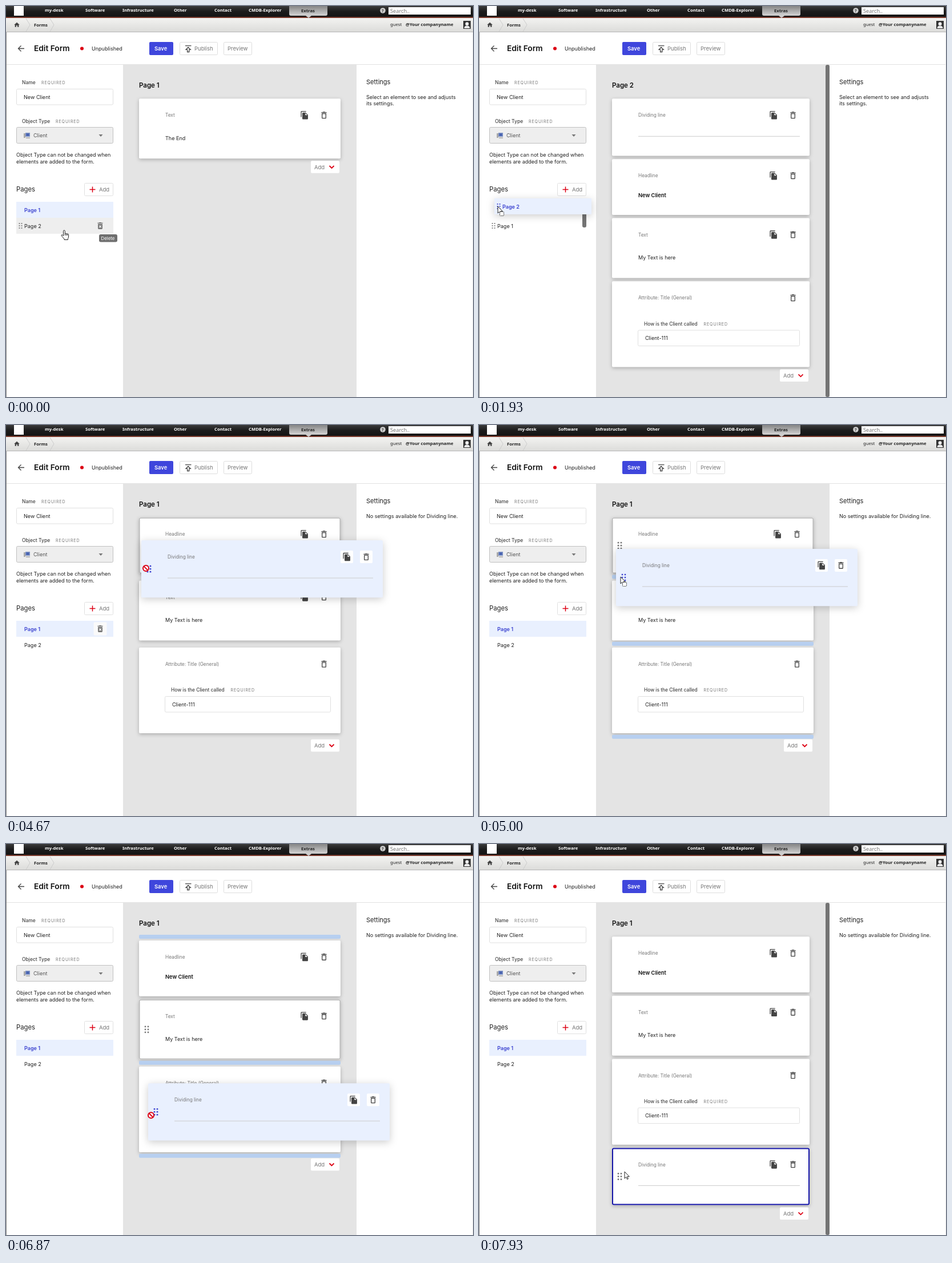
Write an HTML page that moves like this. It is 818x685 px and loops after 8 s.

```html
<!DOCTYPE html>
<html lang="en">
<head>
<meta charset="utf-8">
<title>Form editor</title>
<style>
html, body { margin: 0; width: 100%; height: 100%; overflow: hidden; background: #fff; }
svg { display: block; width: 818px; height: 685px; font-family: Inter, sans-serif; }
.nav { font-family: "Noto Sans", sans-serif; }
.card { filter: drop-shadow(0 2px 3px rgba(0,0,0,.25)); }
.lifted { filter: drop-shadow(0 3px 7px rgba(0,0,0,.2)); }
</style>
</head>
<body>
<svg viewBox="0 0 818 685">
  <defs>
    <linearGradient id="bar" x2="0" y2="1"><stop stop-color="#3a3a3a"/><stop offset=".5" stop-color="#1c1c1c"/><stop offset="1" stop-color="#141414"/></linearGradient>
    <linearGradient id="tab" x2="0" y2="1"><stop stop-color="#777"/><stop offset="1" stop-color="#d4d4d4"/></linearGradient>
    <linearGradient id="crumb" x2="0" y2="1"><stop stop-color="#f3f3f1"/><stop offset="1" stop-color="#dcdcda"/></linearGradient>
  </defs>
  <g id="frame"></g>
  <g id="scene"></g>
</svg>
<script>
const LOOP = 8000;
const INK = '#222', GREY = '#777', BLUE = '#3b42d0', PALE = '#e9f0fe', RED = '#dc0014';
const icons = {
  copy: 'M16 1H4c-1.1 0-2 .9-2 2v14h2V3h12V1zm-1 4l6 6v10c0 1.1-.9 2-2 2H8c-1.1 0-2-.9-2-2V7c0-1.1.9-2 2-2h7zm-1 7h5.5L14 6.5V12z',
  trash: 'M6 19c0 1.1.9 2 2 2h8c1.1 0 2-.9 2-2V7H6v12zM8 9h8v10H8V9zm7.5-5l-1-1h-5l-1 1H5v2h14V4h-3.5z',
  remove: 'M6 19c0 1.1.9 2 2 2h8c1.1 0 2-.9 2-2V7H6v12zm2.5-7.1l1.4-1.4 2.1 2.1 2.1-2.1 1.4 1.4-2.1 2.1 2.1 2.1-1.4 1.4-2.1-2.1-2.1 2.1-1.4-1.4 2.1-2.1zM15.5 4l-1-1h-5l-1 1H5v2h14V4z',
  home: 'M10 20v-6h4v6h5v-8h3L12 3 2 12h3v8z'
};

// y is the middle of the capitals
const text = (x, y, s, size = 9.05, fill = INK, weight = 400, more = '') =>
  `<text x="${x}" y="${y + size * .36}" font-size="${size}" fill="${fill}" font-weight="${weight}" ${more}>${s}</text>`;
const rect = (x, y, w, h, fill, r = 0, stroke = 'none', sw = 1) =>
  `<rect x="${x}" y="${y}" width="${w}" height="${h}" rx="${r}" fill="${fill}" stroke="${stroke}" stroke-width="${sw}"/>`;
const line = (d, stroke, sw = 1) => `<path d="${d}" fill="none" stroke="${stroke}" stroke-width="${sw}"/>`;
const shape = (d, fill, more = '') => `<path d="${d}" fill="${fill}" ${more}/>`;
const icon = (name, x, y, fill = '#444', k = .66) =>
  shape(icons[name], fill, `transform="translate(${x - 12 * k} ${y - 12 * k}) scale(${k})"`);
const required = (x, y) => text(x, y, 'REQUIRED', 7, GREY, 400, 'letter-spacing=".95"');

function dots(x, y, gap, r, fill) {
  let s = '';
  for (let i = 0; i < 6; i++)
    s += `<circle cx="${x + (i % 2 - .5) * gap}" cy="${y + ((i >> 1) - 1) * gap}" r="${r}" fill="${fill}"/>`;
  return s;
}

function frame() {
  const menu = [[68, 'my-desk'], [139, 'Software'], [204, 'Infrastructure'], [294, 'Other'], [365, 'Contact'], [425, 'CMDB-Explorer']];
  return `<g class="nav">` +
    rect(0, 0, 818, 19, 'url(#bar)') + rect(0, 19, 818, 2, '#7a3a2c') +
    rect(14, 0, 17, 17, '#fff') +
    rect(496, -3, 67, 20, 'url(#tab)', 3) + shape('M525 17h10l-5 4z', '#ccc') +
    menu.map(([x, s]) => text(x, 7.5, s, 7.7, '#fff', 700)).join('') +
    text(517, 7.8, 'Extras', 7.7, INK, 700) +
    `<circle cx="660" cy="8" r="4.8" fill="#ccc"/>` + text(658, 8, '?', 7.5, '#333', 700) +
    rect(670, 2, 144, 13, '#fff') + text(673, 9, 'Search..', 9.2, GREY) +
    rect(0, 21, 818, 24, 'url(#crumb)') + rect(0, 45, 818, 1, '#b5b5b5') +
    icon('home', 19, 33, '#444', .48) +
    line('M35 22l7 11-7 12M77 22l7 11-7 12', '#ccc') +
    text(49, 33, 'Forms', 7.7, INK, 700) +
    text(673, 32.5, 'guest', 7.7, INK) + text(700, 32.5, '@Your companyname', 7.7, INK, 700) +
    rect(801, 26, 13, 14, '#333') +
    `<circle cx="807.5" cy="31.3" r="3" fill="#eee"/>` + shape('M802.5 39q0-4.5 5-4.5t5 4.5z', '#eee') + '</g>' +
    rect(0, 46, 1, 639, '#888') + rect(205, 103, 409, 582, '#e4e4e4') +
    rect(1, 102, 817, 1, '#e2e2e2') + rect(817, 46, 1, 639, '#eee') +
    line('M32 74.5H21.5M26.5 69.5l-5 5 5 5', '#444', 1.3) +
    text(49, 74.5, 'Edit Form', 13.7, '#111', 600) +
    `<circle cx="133" cy="74.5" r="3" fill="${RED}"/>` + text(150, 75, 'Unpublished') +
    rect(251, 63, 42, 23, '#3f46dc', 2) + text(260, 75, 'Save', 9.4, '#fff', 600) +
    rect(304.5, 63.5, 66, 22, '#fff', 2, '#ddd') + text(330, 75, 'Publish', 9.5, GREY) +
    line('M314 69.6h10.5M319.2 72.3l-4 4h2.4v4.2h3.2v-4.2h2.4z', '#444', 1.3) +
    rect(381.5, 63.5, 49, 22, '#fff', 2, '#ddd') + text(388, 75, 'Preview', 9.5, GREY) +
    text(28, 134, 'Name', 8.5, '#444', 500) + required(62, 134.5) +
    rect(18.5, 145.5, 169, 27.5, '#fff', 2, '#e0e0e0') + text(31, 159.7, 'New Client') +
    text(28, 201.5, 'Object Type', 8.5, '#444', 500) + required(87, 202) +
    rect(18.5, 212.5, 169, 28, '#eee', 2, '#c0c0c0') +
    rect(31, 223, 3, 8, '#aaa') + rect(34, 222, 8, 7, '#7f93c4') + rect(35.5, 223.5, 5, 4, '#4560b0') + rect(35, 230, 7, 2, '#b5b5b5') +
    text(48, 227.2, 'Client', 9.05, '#555') + shape('M162.5 225h7l-3.5 4z', GREY) +
    text(18, 261, 'Object Type can not be changed when') + text(18, 273, 'elements are added to the form.') +
    text(18, 320.5, 'Pages', 11.3) +
    rect(137.5, 310.5, 50, 22, '#fff', 2, '#e0e0e0') + line('M146.5 321.5h10M151.5 316.5v10', RED, 1.5) + text(163, 321.7, 'Add', 9.5, GREY) +
    text(631, 133, 'Settings', 11);
}

// Form cards
const height = { line: 100.2, head: 97.7, text: 105, end: 105, attr: 150.3 };
const label = { line: 'Dividing line', head: 'Headline', text: 'Text', end: 'Text', attr: 'Attribute: Title (General)' };
const GAP = 5.7, ZONE = 6.7, TOP = 162.3;

function card(kind, x, y, w, mode) {
  const h = height[kind], right = x + w, lifted = mode == 'lifted', left = x + 46;
  let s = `<g class="${lifted ? 'lifted' : 'card'}">${rect(x, y, w, h, lifted ? PALE : '#fff', 2)}</g>`;
  if (mode == 'selected') s += rect(x + 1, y + 1, w - 2, h - 2, 'none', 2, '#1414a8', 2);
  if (mode == 'hover') s += rect(x + .8, y + .8, w - 1.6, h - 1.6, 'none', 2, '#b8b8b8', 1.5);
  if (mode) s += dots(x + 13.5, y + h / 2, 5, 1.4, lifted ? BLUE : GREY);
  const button = (name, bx) => (lifted ? rect(bx - 11, y + 18, 22, 22, '#fff', 2) : '') + icon(name, bx, y + 29);
  s += text(left, y + 29.2, label[kind], 8.3, GREY) + button('trash', right - 29);
  if (kind != 'attr') s += button('copy', right - 63);
  if (kind == 'line') s += rect(left, y + 65.5, w - 63, 1, '#ccc');
  if (kind == 'head') s += text(left, y + 63.8, 'New Client', 9.3, '#111', 600);
  if (kind == 'text') s += text(left, y + 69, 'My Text is here');
  if (kind == 'end') s += text(left, y + 69, 'The End');
  if (kind == 'attr') s += text(x + 56, y + 74.2, 'How is the Client called', 8.4, '#444', 500) + required(x + 160.5, y + 74.7) +
    rect(left - .5, y + 85.7, w - 63, 27.5, '#fff', 2, '#e0e0e0') + text(x + 58, y + 99.8, 'Client-111');
  return s;
}

// hole: index from which the lifted card was taken, -1 when none
function form(title, kinds, { mark = -1, mode = '', hole = -1, glow = 0 } = {}) {
  const dragging = hole >= 0, scroll = !dragging && kinds.length > 1, w = scroll ? 346 : 353;
  let s = text(233, 138.7, title, 11.5, '#111', 600), y = TOP;
  const zone = (i, zy) => {
    if (!dragging || i == hole) return;
    s += `<g opacity="${glow}">${rect(233, zy, 353, 7, '#b7cff0', 2)}</g>`;
    y += ZONE;
  };
  kinds.forEach((k, i) => {
    zone(i, y - 3.3);
    s += card(k, 233, y, w, i == mark ? mode : '');
    y += height[k] + GAP;
  });
  zone(kinds.length, y - 3);
  const ax = 181 + w, ay = y - 1.7;
  s += rect(ax, ay, 50, 21.5, '#fff', 2) + text(ax + 6, ay + 10.8, 'Add', 9.5, GREY) +
    line(`M${ax + 32.5} ${ay + 8.7}l4 4 4-4`, RED, 1.8);
  if (scroll) s += rect(607, 103, 7, 582, '#747474', 3);
  return s;
}

// Page list entries
function entry(name, x, y, { fill = 'none', blue, handle, bin, focus } = {}) {
  return rect(x, y, 170, 28, fill) + (focus ? rect(x + .7, y + .7, 168.6, 26.6, 'none', 0, '#8d8974', 1.4) : '') +
    (handle ? dots(x + 7.5, y + 14, 4, 1.1, blue ? BLUE : GREY) : '') +
    text(x + 14, y + 14.3, name, 9.05, blue ? BLUE : INK, blue ? 600 : focus ? 500 : 400) +
    (bin ? (bin == 'box' ? rect(x + 135.5, y + 2.5, 23, 23, '#fafafa', 2) : '') + icon('remove', x + 147, y + 14, focus ? '#333' : GREY) : '');
}
const chosen = { fill: PALE, blue: true };

// Pointer: time, x, y, kind from that time on
const track = [
  [0, 102, 393, 'hand'], [70, 102, 393, 'hand'], [270, 20, 385, 'hand'], [470, 20, 385, 'hand'], [670, 24, 380, 'hand'],
  [870, 24, 380, 'hand'], [1000, 24, 386, 'drop'], [1670, 31, 375, 'drop'], [1730, 31, 375, 'drop'], [1930, 33, 351, 'drop'],
  [2070, 33, 351, 'hand'], [2500, 27, 355, 'hand'], [3000, 27, 355, 'hand'], [3200, 75, 341, 'arrow'], [3400, 131, 331, 'arrow'],
  [3600, 195, 268, 'arrow'], [3800, 244, 212, 'hand'], [3870, 244, 212, 'hand'], [4000, 248, 211, 'hand'], [4270, 248, 211, 'hand'],
  [4400, 246, 218, 'stop'], [4670, 245, 251, 'stop'], [4870, 247, 265, 'drop'], [5000, 248, 266, 'drop'], [5400, 248, 266, 'arrow'],
  [5870, 248, 266, 'arrow'], [6000, 249, 295, 'hand'], [6070, 249, 311, 'hand'], [6330, 249, 311, 'hand'], [6470, 249, 320, 'stop'],
  [6670, 252, 385, 'stop'], [6730, 252, 385, 'stop'], [6870, 254, 475, 'stop'], [7200, 258, 560, 'drop'], [7330, 259, 576, 'drop'],
  [7470, 259, 576, 'arrow'], [7930, 255, 574, 'arrow'], [LOOP, 255, 574, 'arrow']
];

function pointer(t) {
  const i = track.findIndex(k => k[0] > t), [t0, x0, y0, kind] = track[i - 1], [t1, x1, y1] = track[i];
  const p = (t - t0) / (t1 - t0);
  return { x: x0 + (x1 - x0) * p, y: y0 + (y1 - y0) * p, kind };
}

function cursor({ x, y, kind }) {
  const pen = 'stroke="#222" stroke-width="1" stroke-linejoin="round"';
  const arrow = shape('M0 0V12l2.8-2.6 1.8 4 1.8-.8-1.8-3.9h3.7z', '#fff', pen);
  const art = {
    arrow,
    drop: arrow + `<rect x="3.5" y="9.5" width="7" height="7" rx="1" fill="#fff" stroke="#222" stroke-dasharray="1.5 1"/>`,
    hand: shape('M-1.5 9V1.3q0-1.3 1.4-1.3t1.4 1.3V6q1-1 2.3-.2 1-.6 2 .4 2-.2 2 1.6V11q0 2-1.2 3.6V16.5H0V15L-4.8 9.6q-.6-1.7.8-1.8 1 0 2.5 2zM1.3 6v3M3.6 6v3M5.6 6.5V9', '#fff', pen),
    stop: `<circle r="5" fill="#fff" stroke="${RED}" stroke-width="2"/>` + line('M-3.5-3.5l7 7', RED, 2)
  };
  return `<g transform="translate(${x.toFixed(1)} ${y.toFixed(1)})">${art[kind]}</g>`;
}

function pages(t, at) {
  const first = 343, second = 371;
  if (t < 870) return entry('Page 1', 18, first, chosen) +
    entry('Page 2', 18, second, { fill: '#eee', handle: true, bin: 'plain' }) +
    (t < 140 ? rect(163, 400, 32, 13.5, '#6e6e6e', 3) + text(166.5, 406.8, 'Delete', 7.9, '#fff') : '');
  if (t < 1000) return entry('Page 1', 18, first) + entry('Page 2', 18, second, { ...chosen, handle: true, bin: 'box' });
  if (t < 2070) return entry('Page 1', 18, t < 1830 ? first : second, { handle: true }) + rect(181, 343, 7, 45, '#747474', 3) +
    `<g class="lifted">${entry('Page 2', at.x - 6, at.y - 14, { ...chosen, handle: true })}</g>`;
  const top = t < 4270 ? { fill: '#eee', handle: true, focus: true, bin: 'box' } : { ...chosen, bin: t < 4800 && 'box' };
  return entry('Page 1', 18, first, top) + entry('Page 2', 18, second);
}

function content(t, at) {
  const start = ['line', 'head', 'text', 'attr'], rest = ['head', 'text', 'attr'];
  const fade = from => Math.min(1, Math.max(0, (t - from) / 130)).toFixed(2);
  if (t < 870) return form('Page 1', ['end']);
  if (t < 4270) return form(t < 2140 ? 'Page 2' : 'Page 1', start, { mark: t < 3730 ? -1 : 0, mode: 'hover' });
  if (t < 4400) return form('Page 1', start, { mark: 0, mode: 'selected' });
  if (t < 5400) return form('Page 1', rest, { mark: 0, mode: 'hover', hole: 0, glow: fade(4680) }) +
    card('line', at.x - 8, at.y - 49, 423, 'lifted');
  if (t < 6400) return form('Page 1', ['head', 'line', 'text', 'attr'], { mark: 1, mode: 'selected' });
  if (t < 7470) return form('Page 1', rest, { mark: 1, mode: 'hover', hole: 1, glow: fade(6730) }) +
    card('line', at.x - 5, at.y - 56, 423, 'lifted');
  return form('Page 1', [...rest, 'line'], { mark: 3, mode: 'selected' });
}

const settings = t => t < 4270
  ? text(631, 159.7, 'Select an element to see and adjusts') + text(631, 171.2, 'its settings.')
  : text(631, 159.7, 'No settings available for Dividing line.');

const scene = document.getElementById('scene');
document.getElementById('frame').innerHTML = frame();
let last = '';

function draw() {
  const t = performance.now() % LOOP, at = pointer(t);
  const next = settings(t) + content(t, at) + pages(t, at) + cursor(at);
  if (next != last) scene.innerHTML = last = next;
  requestAnimationFrame(draw);
}
draw();
</script>
</body>
</html>
```
